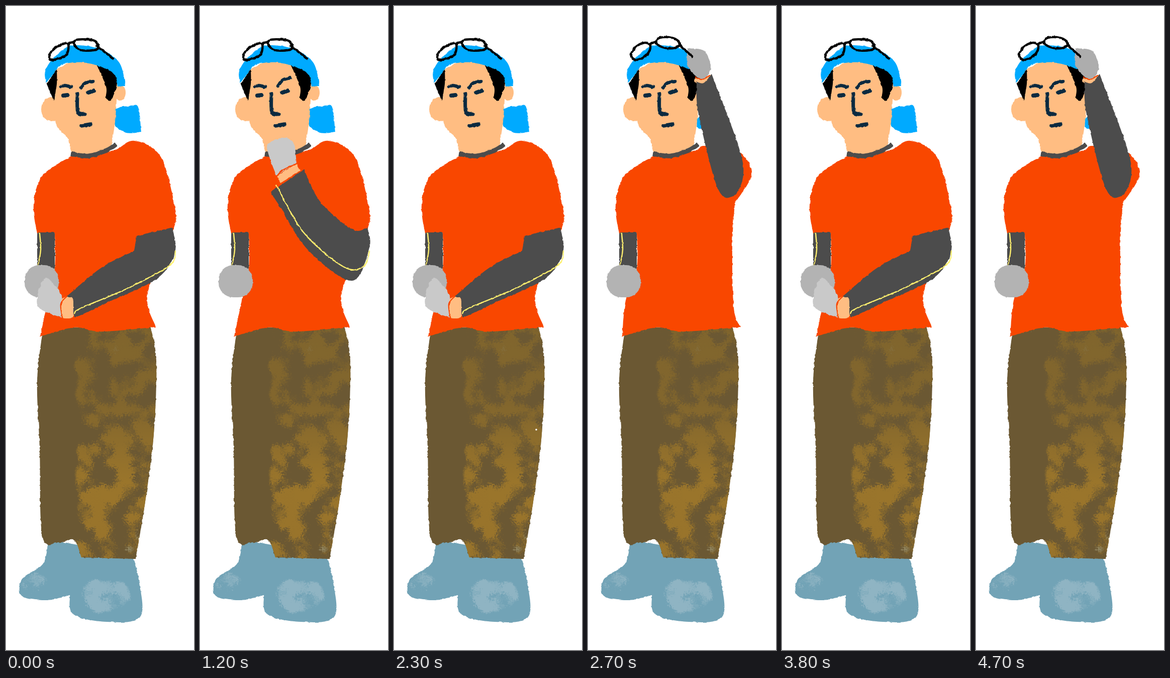
Recreate the animation shown at these times as an HTML page. Size 374 by 1280 pixels, loop 5.7 s.

```html
<!DOCTYPE html>
<html lang="en">
<head>
<meta charset="utf-8">
<title>Thinking worker</title>
<style>
html, body { margin: 0; width: 100%; height: 100%; overflow: hidden; background: #fff; }
svg { display: block; width: 100%; height: 100%; }
.rest, .chin, .head, .low, .dot { animation: 5700ms step-end infinite; }
.rest { animation-name: rest; }
.chin { animation-name: chin; }
.head { animation-name: head; }
.low { animation-name: low; }
.dot { animation-name: dot; }
@keyframes rest {
  0%, 29.8246%, 56.1404% { visibility: visible; }
  21.0526%, 47.3684%, 73.6842%, 100% { visibility: hidden; }
}
@keyframes chin {
  0%, 29.8246%, 82.4561%, 100% { visibility: hidden; }
  21.0526%, 73.6842% { visibility: visible; }
}
@keyframes head {
  0%, 56.1404% { visibility: hidden; }
  47.3684%, 82.4561%, 100% { visibility: visible; }
}
@keyframes low {
  0%, 56.1404% { visibility: visible; }
  47.3684%, 82.4561%, 100% { visibility: hidden; }
}
@keyframes dot {
  0%, 47.3684%, 100% { visibility: hidden; }
  29.8246% { visibility: visible; }
}
</style>
</head>
<body>
<svg id="stage" viewBox="0 0 374 1280" xmlns="http://www.w3.org/2000/svg"></svg>
<script>
const SKIN = '#ffbd82', BLUE = '#00aaff', RED = '#f94700', GREY = '#4c4c4c';
const BROWN = '#6b5833', BOOT = '#72a3b6', INK = '#0a2a40', YELLOW = '#fff06e';
const GLOVE = '#b3b3b3', PALE = '#c9c9c9';

// Smooth curve through key points; "!" marks a corner.
function curve(text, closed) {
  const p = text.trim().split(/\s+/).flatMap(s => {
    const point = s.replace('!', '').split(',').map(Number);
    return s.endsWith('!') ? [point, point] : [point];
  });
  const n = p.length;
  const at = i => closed ? p[(i + n) % n] : p[Math.max(0, Math.min(n - 1, i))];
  let d = 'M' + p[0];
  for (let i = 0; i < (closed ? n : n - 1); i++) {
    const [a, b, c, e] = [at(i - 1), at(i), at(i + 1), at(i + 2)];
    if (b === c) continue;
    const out = b.map((v, k) => v + (c[k] - a[k]) / 6);
    const into = c.map((v, k) => v - (e[k] - b[k]) / 6);
    d += `C${out} ${into} ${c}`;
  }
  return d + (closed ? 'Z' : '');
}
const fill = (color, pts, extra = '') => `<path d="${curve(pts, true)}" fill="${color}" ${extra}/>`;
const line = (color, w, pts, cap = 'round') => `<path d="${curve(pts)}" fill="none" ` +
  `stroke="${color}" stroke-width="${w}" stroke-linecap="${cap}"/>`;
const oval = (color, x, y, rx, ry, turn = 0, extra = '') =>
  `<ellipse cx="${x}" cy="${y}" rx="${rx}" ry="${ry}" fill="${color}" ` +
  `transform="rotate(${turn} ${x} ${y})" ${extra}/>`;
const box = (color, x, y, w, h, r) =>
  `<rect x="${x}" y="${y}" width="${w}" height="${h}" rx="${r}" fill="${color}"/>`;
const group = (name, ...parts) => `<g class="${name}">${parts.join('')}</g>`;

const frame = 'filterUnits="userSpaceOnUse" x="0" y="0" width="374" height="1280" ' +
  'color-interpolation-filters="sRGB"';
const noise = (freq, octaves, seed, name) => `<feTurbulence type="fractalNoise" ` +
  `baseFrequency="${freq}" numOctaves="${octaves}" seed="${seed}" result="${name}"/>`;
const mask = (id, shapes) => `<mask id="${id}" maskUnits="userSpaceOnUse" x="0" y="0" ` +
  `width="374" height="1280"><g filter="url(#grunge)">${shapes}</g></mask>`;
const fade = (id, prop, ...stops) =>
  `<linearGradient id="${id}" gradientUnits="userSpaceOnUse" x1="0" y1="640" x2="0" y2="1100">` +
  stops.map((v, i) => `<stop offset="${i / (stops.length - 1)}" stop-color="#fff" ` +
    `style="${prop}:${v}"/>`).join('') + '</linearGradient>';

const defs = `<defs>
  <filter id="rough" ${frame}>
    ${noise(.13, 2, 3, 'n')}
    <feDisplacementMap in="SourceGraphic" in2="n" scale="3.5" xChannelSelector="R" yChannelSelector="G"/>
  </filter>
  <filter id="grunge" ${frame}>
    ${noise(.3, 2, 5, 'fine')}
    ${noise(.024, 5, 8, 'wide')}
    <feDisplacementMap in="wide" in2="fine" scale="22" xChannelSelector="R" yChannelSelector="G"/>
    <feColorMatrix values="0 0 0 0 0  0 0 0 0 0  0 0 0 0 0  1 0 0 0 0" result="n"/>
    <feGaussianBlur in="SourceGraphic" stdDeviation="5" result="b"/>
    <feComposite in="n" in2="b" operator="arithmetic" k2="1" k3=".45" k4="-.45"/>
    <feColorMatrix values="0 0 0 0 1  0 0 0 0 1  0 0 0 0 1  0 0 0 6 -2.35"/>
  </filter>
  ${fade('rust', 'stop-color', '#80652d', '#82662d', '#9a752b', '#98732b')}
  ${fade('density', 'stop-opacity', .95, .9, 1, .9)}
  ${mask('dirt', box('url(#density)', 137, 635, 170, 470, 0))}
  ${mask('dust', oval('#fff', 55, 1147, 28, 22) + oval('#fff', 195, 1172, 58, 34))}
  ${mask('chalk', oval('#fff', 262, 1050, 9, 18) + oval('#fff', 238, 1080, 24, 12))}
</defs>`;

const boots = `84,1060! 74,1108 33,1138 30,1172 80,1181 127,1171! 134,1209 200,1224 267,1214
  264,1140 251,1092!`;
const pants = `74,640! 62,745 67,880 72,1052 103,1067 135,1061 150,1096! 258,1099! 277,985
  294,850 299,705 287,636!`;
const legs = fill(BOOT, boots) + fill(BROWN, pants);
const grime = fill('url(#rust)', pants, 'mask="url(#dirt)"') +
  fill('#a3c0cc', boots, 'opacity=".6" mask="url(#dust)"') +
  fill('#94a098', pants, 'opacity=".5" mask="url(#chalk)"');

const tail = group('low', fill(BLUE, '218,205 248,199 263,201 269,250! 240,252 216,235')) +
  group('head', oval(BLUE, 222, 232, 6, 12));

const face = oval(SKIN, 90, 205, 20, 24) + oval(SKIN, 227, 172, 11, 16) +
  fill(SKIN, '100,125! 160,105 222,150! 217,230 207,290! 165,305 130,294! 122,262 98,228') +
  fill('#000', '101,125! 101,155 95,188! 81,155!') +
  fill('#000', '180,116! 214,128 221,152 210,185 199,183 199,160') +
  fill(BLUE, `80,153! 78,130 95,103 130,79 185,85 225,112 238,159! 222,160! 212,132 160,113
    112,116 95,134`) +
  line(INK, 6.5, '109,161 117,158 129,161') +
  line(INK, 8, '114,178 122,177') +
  line(INK, 8, '164,172 175,168') +
  line(INK, 7, '142,175 143,211 157,215') +
  line(INK, 7.5, '150,238 168,235');

const calmBrow = line(INK, 6.5, '149,162 158,153 173,150');
const brows = group('rest', calmBrow) + group('head', calmBrow) +
  group('chin', line(INK, 6.5, '155,159 165,147 180,143'));

const rim = 'stroke="#000" stroke-width="4.5"';
const goggles = group('low',
  fill('none', '88,107 93,87 122,74 119,98', rim),
  fill('none', '137,68 176,69 181,86 146,87', rim),
  line('#000', 4.5, '124,74 137,71'),
  line('#000', 4.5, '181,80 213,104'));
const roundGoggles = oval('none', 105, 90, 22, 13, -38, rim) + oval('none', 159, 73, 24, 11, 7, rim) +
  line('#000', 4.5, '123,75 136,71') + line('#000', 4.5, '182,78 207,100');

const hem = '190,647 135,639 68,657!';
const leftSide = '97,520 97,452! 62,452! 55,395 72,338';
const shirt = group('low', fill(RED, `128,299! 210,289 255,268 308,300 337,405 334,442! 282,570
    298,638! ${hem} 83,585 ${leftSide}`)) +
  group('head', fill(RED, `128,299! 210,289 232,278 300,290 325,335 292,392! 287,480 290,600
    303,638! ${hem} 75,585 ${leftSide}`)) +
  line(GREY, 9, '129,294 165,298 200,287 219,275', 'butt');

const leftArm = box(GREY, 62, 450, 35, 75, 4) + line(YELLOW, 2.4, '67,452 69,485 63,518') +
  box(GLOVE, 37, 515, 68, 64, 29);

const rest = group('rest',
  fill(GREY, '260,457! 331,440! 336,490 300,542 200,590 137,620! 121,577! 190,520 255,487!'),
  line(YELLOW, 2.4, '337,487 325,516 240,562 150,600 136,611'),
  fill(PALE, '75,543 86,543 111,578 112,620! 66,600 64,570'),
  box(SKIN, 110, 578, 24, 43, 8),
  line(RED, 2.2, '121,577 109,592 112,619'));

const chin = group('chin',
  fill(PALE, '135,275 165,262 186,272 192,312! 152,337! 138,300'),
  fill(SKIN, '153,338! 192,312! 200,327! 160,352!'),
  line(RED, 2.2, '153,338 165,326 193,313'),
  fill(GREY, '140,370! 207,325! 240,390 303,444 333,440! 337,480 302,546 215,485 156,394'),
  line(YELLOW, 2.4, '152,356 206,450 285,518 325,518 337,487'));

const head = group('head',
  line(SKIN, 10, '216,148 230,150 243,142'),
  fill(GREY, '216,150! 230,153 246,135! 298,274 309,335 290,377 258,362 220,215'),
  fill('#adadad', '198,84! 232,90 244,125 226,146 199,120'),
  line(RED, 2.2, '213,142 227,146 242,138'),
  roundGoggles);

document.getElementById('stage').innerHTML = `${defs}
  <g filter="url(#rough)">${legs}</g>
  ${grime}
  <circle class="dot" cx="283" cy="842" r="1.8" fill="#fff"/>
  <g filter="url(#rough)">${tail}${face}${brows}${goggles}${shirt}${leftArm}${rest}${chin}${head}</g>`;
</script>
</body>
</html>
```
